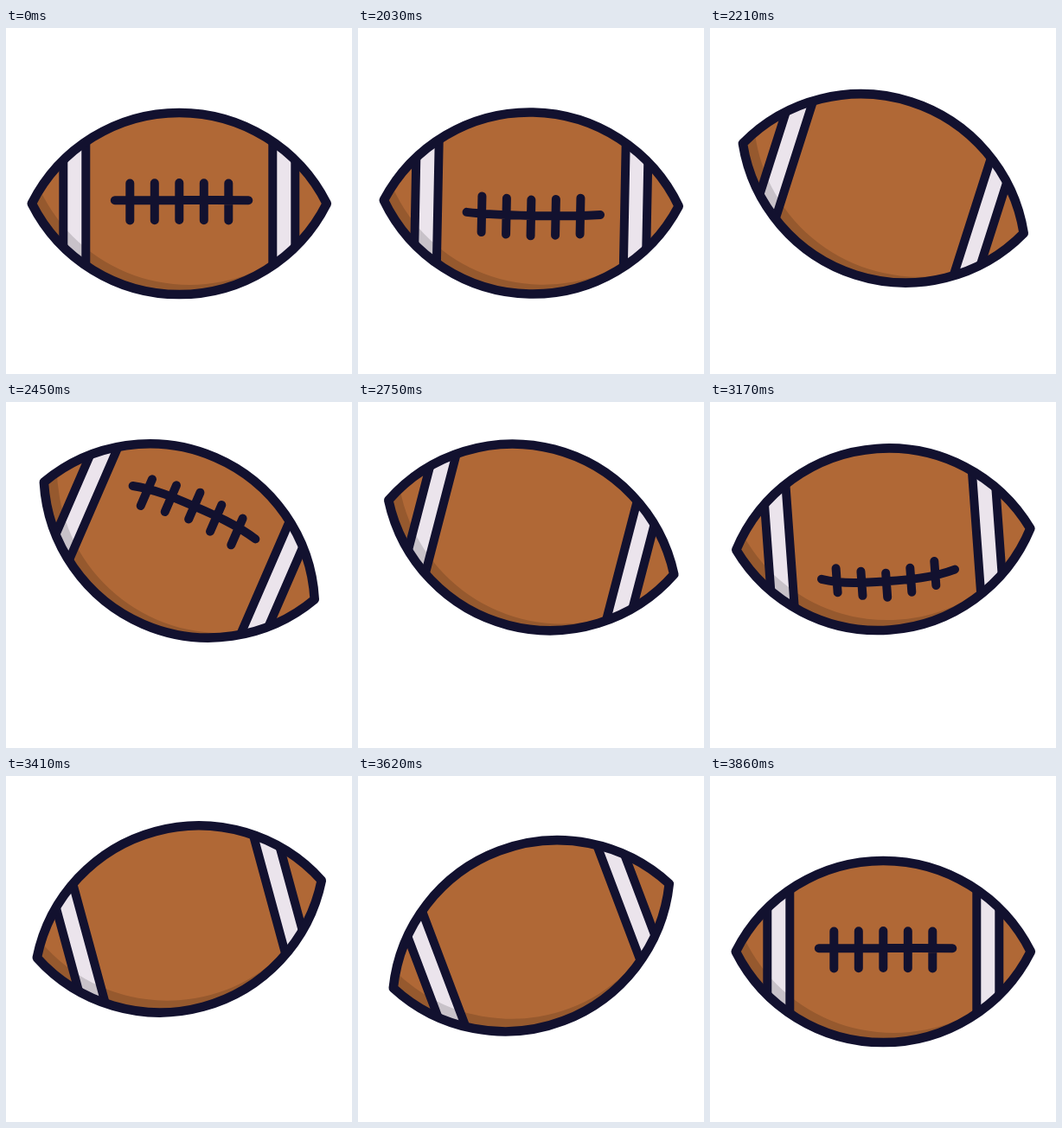
Animation, 400 px wide and 400 px high, one loop 3890 ms. Source, as an HTML page:

```html
<!DOCTYPE html>
<html lang="en">
<head>
<meta charset="utf-8">
<title>Spinning football</title>
<style>
  html, body { margin: 0; width: 100%; height: 100%; overflow: hidden; background: #fff; }
  svg { display: block; width: 100%; height: 100%; }
  .line { fill: none; stroke: #12112f; stroke-width: 10; stroke-linejoin: round; }
  #outline { stroke-width: 10.6; }
  #laces { stroke-linecap: round; }
</style>
</head>
<body>
<svg viewBox="0 0 400 400">
  <defs>
    <path id="shape" d="M-170.5 0A190.9 190.9 0 0 1 170.5 0A190.9 190.9 0 0 1 -170.5 0Z"/>
    <clipPath id="inside"><use href="#shape"/></clipPath>
  </defs>
  <g id="ball">
    <g clip-path="url(#inside)">
      <use href="#shape" fill="#b06836"/>
      <path fill="#ebe4ec" d="M-134 -110h26v220h-26zM108 -110h26v220h-26z"/>
      <path fill="#000" fill-opacity=".15" fill-rule="evenodd"
        d="M-200 -300H220V130H-200ZM-179 -97a191 191 0 0 0 382 0a191 191 0 0 0 -382 0Z"/>
      <path class="line" d="M-134 -110v220M-108 -110v220M108 -110v220M134 -110v220"/>
      <path class="line" id="laces"/>
    </g>
    <use href="#shape" class="line" id="outline"/>
  </g>
</svg>
<script>
const LOOP = 3890, REST = 2000, STEP = 30, STEPS = 62;
const ball = document.getElementById('ball');
const laces = document.getElementById('laces');

// Keys are [step, value, slope], joined by Hermite curves.
const TILT = [[0, 0, .7], [11, 24.4, 0], [36, 0, -1.32], [55.5, -20.9, 0], [62, 0, .7]];
const LIFT = [[0, 0, 0], [15, -42.6, -.9], [25, -46.6, 0], [39, -44.3, .55],
              [47, -37.6, 1.7], [54, -18.2, 3], [62, 0, 0]];

function track(keys, k) {
  const i = Math.max(1, keys.findIndex(key => key[0] >= k));
  const [k0, v0, s0] = keys[i - 1], [k1, v1, s1] = keys[i];
  const span = k1 - k0, u = (k - k0) / span, w = 1 - u;
  return v0 * w * w * (1 + 2 * u) + v1 * u * u * (3 - 2 * u)
       + span * u * w * (s0 * w - s1 * u);
}

// Three full turns about the long axis, slowing towards the end.
function spinAngle(k) {
  const u = Math.max(0, (k - .3) / (STEPS - .3));
  const turns = 3 * (u + u * (1 - u) * (.314 + .092 * u));
  return turns * 2 * Math.PI - .036;
}

// The laces flatten and bend as they near the edge, then slip behind it.
function lacePath(angle) {
  const cos = Math.cos(angle), sin = Math.sin(angle);
  if (cos <= 0) return '';
  const y = 70 * sin + 35 * sin ** 21;
  const mid = .95 * y - 1.7, end = mid - .15 * y, half = 21.5 * cos;
  let d = `M-74.5 ${end}C-50 ${mid} -25 ${mid} 0 ${mid}C27 ${mid} 53 ${mid} 80 ${end}`;
  for (let i = -2; i <= 2; i++) {
    const center = y * (1 - .18 * Math.abs(i / 2) ** 1.3);
    d += `M${i * 28.5} ${center - half}v${2 * half}`;
  }
  return d;
}

function draw(time) {
  const k = Math.min(STEPS, Math.max(0, Math.floor((time % LOOP - REST) / STEP)));
  ball.setAttribute('transform',
    `translate(200.3 ${203 + track(LIFT, k)}) rotate(${track(TILT, k)})`);
  laces.setAttribute('d', lacePath(k < STEPS ? spinAngle(k) : spinAngle(0)));
}

function tick() {
  draw(performance.now());
  requestAnimationFrame(tick);
}
tick();
</script>
</body>
</html>
```
